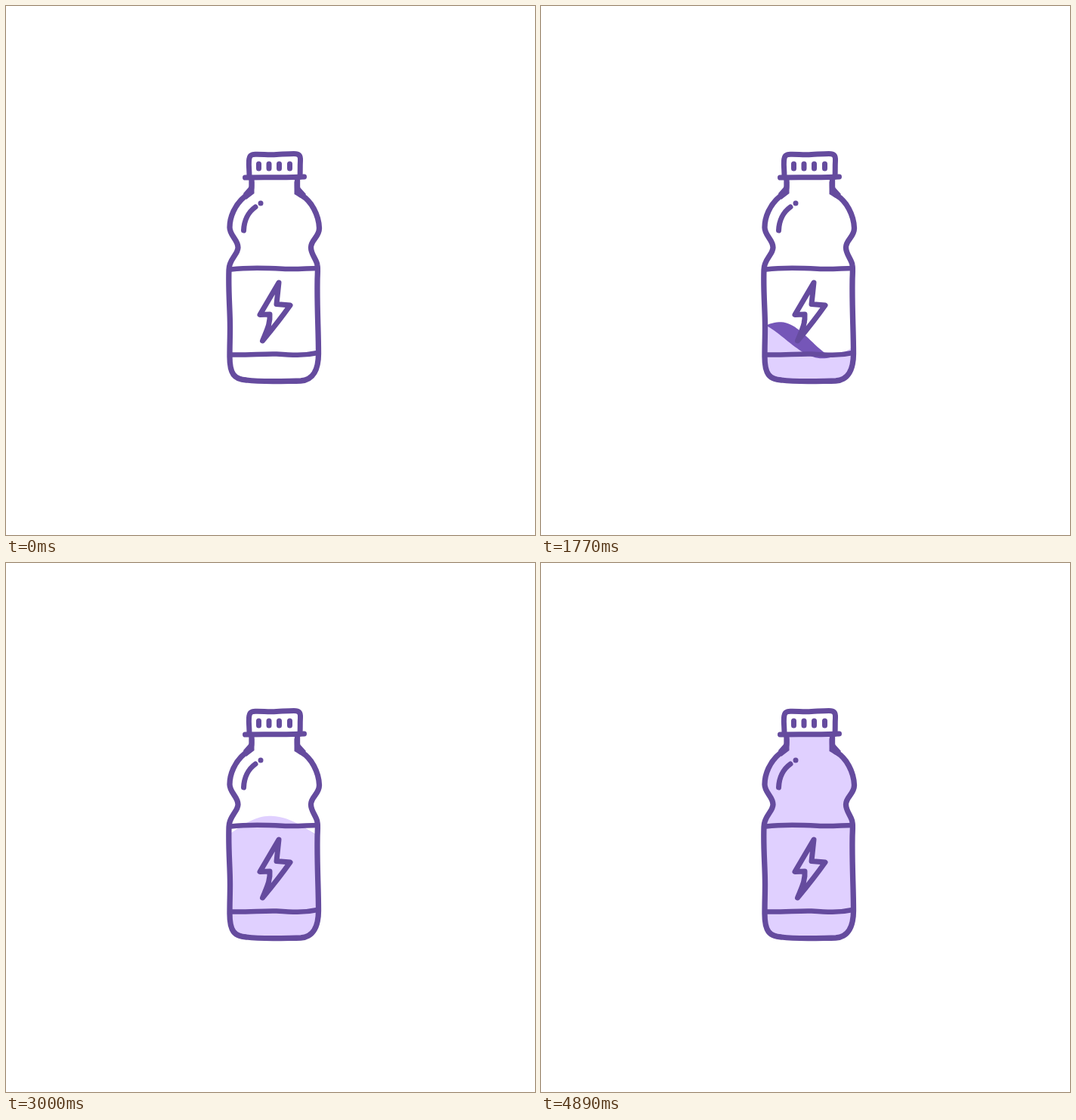
An HTML page that plays this animation: 700x700 px, repeating every 5370 ms.

```html
<!DOCTYPE html>
<html lang="en">
<head>
<meta charset="utf-8">
<title>Filling bottle</title>
<style>
  html, body { margin: 0; width: 100%; height: 100%; overflow: hidden; background: #fff; }
  svg { display: block; width: 100vw; height: 100vh; }
  .ink { fill: none; stroke: #654b9e; stroke-width: 7; stroke-linecap: round; stroke-linejoin: round; }
  .wedge { fill: #654b9e; }
</style>
</head>
<body>
<svg viewBox="0 0 700 700">
  <defs>
    <path id="body" d="M325 229V238C325 247 320 249 315 253C303 263 296 279 296 293
      C296 304 307 309 307 319.500C307 329 295 335 295 349C294 379 296.500 400 296.500 425
      C296.500 440 296 448 296 464C296 487 302 494 318 495C340 498 364 496.500 390 496
      C407 495 413.500 480 413.500 460C413.500 430 411.500 400 412 365
      C412 355 413 349 412 343C411 335 403.500 329 403.500 319.500
      C403.500 309 414.500 306 414.500 294C414 277 404 257 390 250C387 248 385.500 246 385.500 238V229"/>
    <clipPath id="inside"><use href="#body"/></clipPath>
  </defs>
  <g clip-path="url(#inside)">
    <path id="back" fill="#7556b8"/>
    <path id="middle" fill="#9b7be0"/>
    <path id="front" fill="#e0d0ff"/>
  </g>
  <g class="ink">
    <use href="#body" stroke-width="7.300"/>
    <path d="M322 226C322 216 321 212 321.500 205C322 198 324 196.500 330 196.300C340 196 348 197.500 358 196.500
      C368 196 374 195.500 381 195.500C388 195.500 390 198 389.500 205C389 213 389.500 218 389 226"/>
    <path d="M316.500 227C340 226 370 227.500 394.500 226"/>
    <path d="M334.500 209v6M348 209v6M361.500 209v6M375.500 209v6"/>
    <path d="M314.500 297C315 285 320 273 330 266M337 261h.01"/>
    <path d="M298 348.500C325 345 352 347 372 348C388 348.500 400 347 412 347" stroke-width="6.500"/>
    <path d="M298 461.500C322 462 340 460 358 460.500C378 462 394 463 412 459" stroke-width="6.500"/>
    <path d="M361 366L336 408.500L349 408C350 420 345 429 339.500 443C352 428 364 413 376 396L358 394.500Z"/>
  </g>
  <path class="wedge" d="M328.500 232V248L318 256L314 248L321 240ZM381.500 232V249L392 255L397 249L389 240Z"/>
</svg>
<script>
  const LOOP = 5370, STEP = 30, FULL = 4890, SWELL = 25;

  // Alternating crests and troughs along each wave, as x positions at 1050 ms.
  const waves = {
    front:  { speed: .108, turns: [135, 240, 353, 450, 560, 682, 772, 865, 960] },
    back:   { speed: .120, turns: [210, 305, 403, 485, 580, 716, 811, 905, 1000] },
    middle: { speed: .136, turns: [60, 180, 300, 420, 540, 660, 780, 900, 1020] }
  };
  waves.front.firstCrest = 0;
  waves.back.firstCrest = 0;
  waves.middle.firstCrest = 1;

  const frontLevel = t => 489 - .0663 * (t - 1050);
  const levels = {
    front: frontLevel,
    back: t => frontLevel(t) + 2 - Math.max(0, t - 3000) * .0085,
    middle: t => 470 + Math.max(0, 810 - t) * .1 + Math.max(0, t - 1350) * .05
  };

  function height({ turns, firstCrest }, u) {
    let i = turns.findIndex(x => x > u) - 1;
    if (i < 0) i = u < turns[0] ? 0 : turns.length - 2;
    const phase = i + firstCrest + (u - turns[i]) / (turns[i + 1] - turns[i]);
    return -SWELL * Math.cos(Math.PI * phase);
  }

  function drawWave(name, t) {
    const wave = waves[name], level = levels[name](t);
    const shift = wave.speed * (t - 1050);
    let d = "M288 505";
    for (let x = 288; x <= 420; x += 3) {
      d += `L${x} ${(level + height(wave, x + shift)).toFixed(2)}`;
    }
    document.getElementById(name).setAttribute("d", d + "V505Z");
  }

  function frame(now) {
    const time = Math.floor(now % LOOP / STEP) * STEP;
    const t = Math.min(time, FULL);
    for (const name in waves) {
      if (t <= 300) document.getElementById(name).setAttribute("d", "");
      else drawWave(name, t);
    }
    requestAnimationFrame(frame);
  }
  requestAnimationFrame(frame);
</script>
</body>
</html>
```
